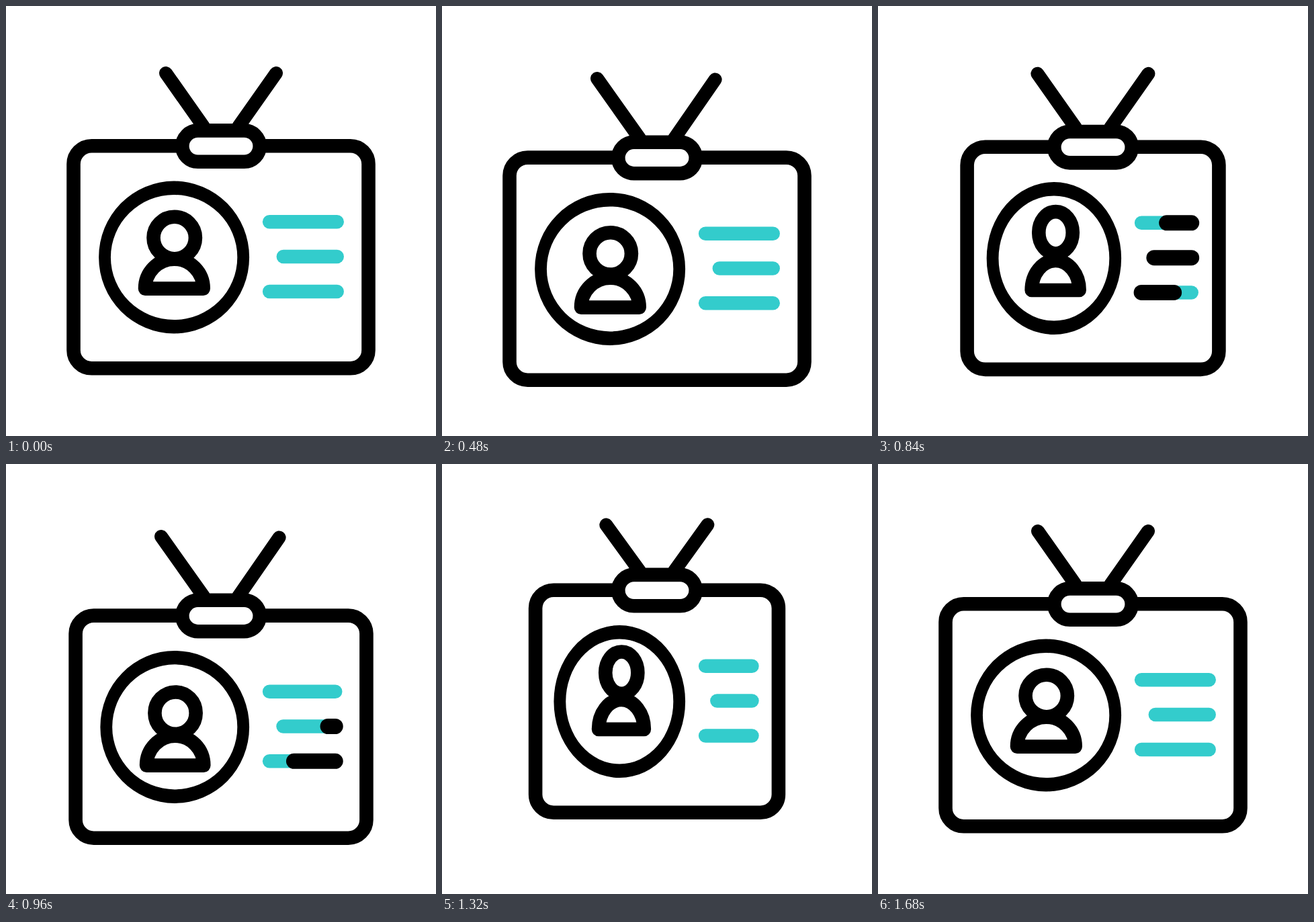
Recreate the animation shown at these times as an HTML page. Size 640x640 px, loop 1.88 s.

```html
<!DOCTYPE html>
<html lang="en">
<head>
<meta charset="utf-8">
<title>ID badge</title>
<style>
  html, body { margin: 0; width: 100%; height: 100%; overflow: hidden; background: #fff; }
  svg { display: block; width: 100%; height: 100%; }
  .ink { fill: none; stroke: #000; stroke-width: 20.6; stroke-linecap: round; stroke-linejoin: round; }
  .teal { stroke: #3cc; stroke-width: 20.5; stroke-linecap: round; }
  .sweep { stroke: #000; stroke-width: 23; stroke-linecap: round; }
</style>
</head>
<body>
<svg viewBox="0 0 640 640">
  <g id="badge">
    <rect id="card" class="ink" y="208.2" height="331.1" rx="27"/>
    <path id="ring" fill-rule="evenodd"/>
    <g id="lines"></g>
  </g>
  <ellipse id="head" class="ink" ry="31.2"/>
  <path id="body" class="ink"/>
  <path id="straps" class="ink" style="stroke-width:20"/>
  <rect id="clip" class="ink" x="262.3" y="185.4" width="115.4" height="46.4" rx="23.2" style="fill:#fff"/>
</svg>
<script>
const LOOP = 1880, STEP = 20;
const $ = id => document.getElementById(id);
const set = (el, attrs) => { for (const k in attrs) el.setAttribute(k, attrs[k]); };
const clamp = v => Math.min(1, Math.max(0, v));
const mix = (a, b, k) => a + (b - a) * k;

// Keys are [time, value]; each span eases in and out on a sine.
function track(keys, t) {
  if (t <= keys[0][0]) return keys[0][1];
  for (let i = 1; i < keys.length; i++) {
    const [t0, a] = keys[i - 1], [t1, b] = keys[i];
    if (t < t1) return mix(a, b, (1 - Math.cos(Math.PI * (t - t0) / (t1 - t0))) / 2);
  }
  return keys[keys.length - 1][1];
}

const bounce = [[300, 0], [480, 17.4], [680, -23.4], [960, 17.4], [1200, -24], [1680, 0]];
const bodyBounce = [[300, 0], [480, 28], [705, -28.5], [960, 28], [1220, -29], [1680, 0]];
const headBounce = [[300, 0], [500, 24], [722, -36], [972, 26], [1230, -38], [1680, 0]];
const squeeze = [[548, 0], [779, 39], [1000, 0], [1342, 39], [1680, 0]];

const SWEEP = { start: 608, lag: 69.5, time: 143, hold: 160 };

function addLine(cls, y) {
  const el = document.createElementNS('http://www.w3.org/2000/svg', 'line');
  set(el, { class: cls, y1: y, y2: y });
  return $('lines').appendChild(el);
}
const lines = [[392.1, 0], [412.8, 0.09], [392.1, 0]].map(([x, shift], i) => {
  const y = 321.3 + 51.8 * i;
  return { x, shift, teal: addLine('teal', y), sweep: addLine('sweep', y) };
});

const ellipse = (cx, cy, rx, ry) =>
  `M${cx - rx} ${cy}a${rx} ${ry} 0 1 1 ${2 * rx} 0a${rx} ${ry} 0 1 1 ${-2 * rx} 0z`;

function drawLines(t, d) {
  lines.forEach(({ x, shift, teal, sweep }, i) => {
    const a = x - shift * d, b = 492.7 - 0.81 * d;
    set(teal, { x1: a, x2: b });
    const p = t - SWEEP.start - SWEEP.lag * i;
    const from = clamp((p - SWEEP.hold) / SWEEP.time), to = clamp(p / SWEEP.time);
    set(sweep, {
      x1: mix(a, b, from), x2: mix(a, b, to),
      visibility: to > from ? 'visible' : 'hidden'
    });
  });
}

function drawStraps(y) {
  const k = y > 0 ? y / 17.4 : -y / 23.4;
  const [lx, ly, rx, ry] = y > 0 ? [-7, 8, 4.6, 9.4] : [7.2, -10.7, -7.6, -11];
  $('straps').setAttribute('d',
    `M${238 + lx * k} ${100 + ly * k}L294 ${179.5 + y}` +
    `M${402 + rx * k} ${100 + ry * k}L346 ${179.5 + y}`);
}

function draw(t) {
  const y = track(bounce, t), d = track(squeeze, t);
  const move = `translate(0 ${y})`;
  $('badge').setAttribute('transform', move);
  $('clip').setAttribute('transform', move);

  set($('card'), { x: 100.5 + d, width: 439 - 2 * d });
  const cx = 250.1 + 0.367 * d, shrink = 0.367 * d;
  $('ring').setAttribute('d',
    ellipse(cx, 374, 112 - shrink, 113.5) + ellipse(cx, 374, 94.2 - shrink, 93));

  set($('head'), { cx: 250.7 + 0.43 * d, cy: 345 + track(headBounce, t), rx: 31.2 - 0.185 * d });
  const left = 207 + 0.675 * d, right = 293.7 + 0.185 * d, base = 420.6 + track(bodyBounce, t);
  $('body').setAttribute('d',
    `M${left} ${base}A${(right - left) / 2} 44 0 0 1 ${right} ${base}Z`);

  drawLines(t, d);
  drawStraps(y);
}

const begin = performance.now();
function frame() {
  const t = (performance.now() - begin) % LOOP;
  draw(Math.floor(t / STEP) * STEP);
  requestAnimationFrame(frame);
}
frame();
</script>
</body>
</html>
```
